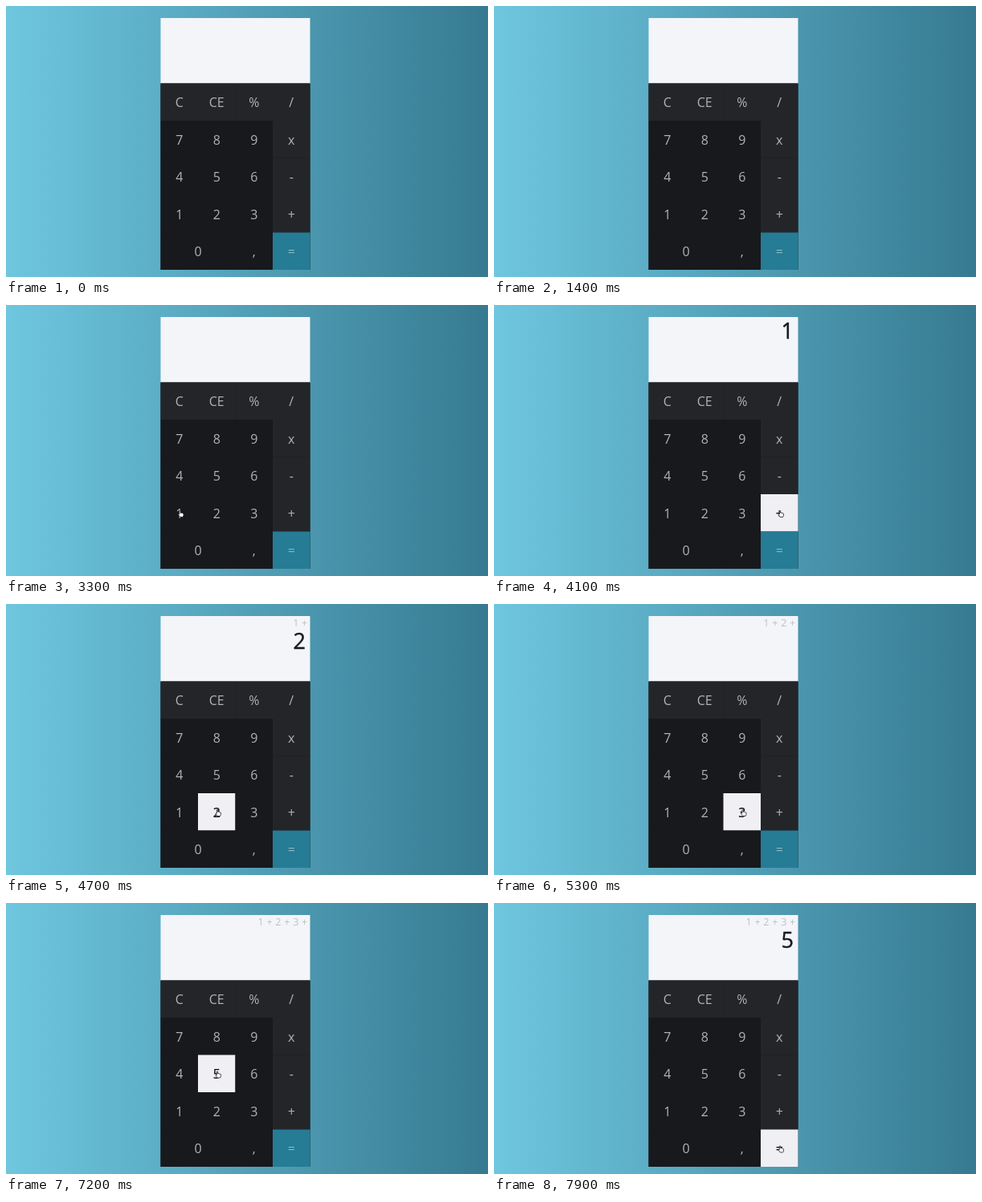
These frames come from a looping animation (600x338 px, 8 s). An HTML page:

```html
<!DOCTYPE html>
<html lang="en">
<head>
<meta charset="utf-8">
<title>Calculator</title>
<style>
  html, body { margin: 0; width: 100%; height: 100%; overflow: hidden; }
  body { background: linear-gradient(90deg, #6ec7df, #367a91); }
  svg { display: block; width: 600px; height: 338px; }
  text { font-family: "Open Sans", "Noto Sans", sans-serif; }
  .key text { font-size: 16px; text-anchor: middle; fill: #b2b3b7; }
  .key rect { fill: #18191c; }
  .key.op rect { fill: #242529; }
  .key.equals rect { fill: #267b95; }
  .key.equals text { fill: #92bac6; }
  .key.lit rect { fill: #f0eff4; }
  .key.lit text { fill: #08080a; stroke: #08080a; stroke-width: .2px; }
  #history { font-size: 12.6px; word-spacing: .45px; fill: #bfc0c4; text-anchor: end; }
  #value { font-size: 27px; fill: #18191c; stroke: #18191c; stroke-width: .4px; text-anchor: end; }
  #pointer { fill: #fff; stroke: #222; stroke-linejoin: round; }
</style>
</head>
<body>
<svg viewBox="0 0 600 338">
  <rect x="192.5" y="15" width="186" height="82" fill="#f4f5f9"/>
  <rect x="192.5" y="96.5" width="186" height="232.5" fill="#18191c"/>
  <text id="history" x="375.3" y="28"></text>
  <text id="value" x="373" y="56"></text>
  <g id="keys"></g>
  <g id="pointer">
    <path id="arrow" d="M-4-6V5L-1.5 2.8 0 6.3 1.7 5.5.2 2.2H3.5Z"/>
    <path id="hand" d="M-2.3 1V-4.3Q-1.5-5.8-.7-4.3V-1.2Q.5-2 1.1-.9 2.3-1.5 2.7-.4 4-.7 4 .6V2.6L2.9 5.2H-1.4L-4 1.4Q-3.7.1-2.3 1Z"/>
  </g>
</svg>
<script>
const LOOP = 8000, STEP = 100, CELL = 46.5, LEFT = 192.5, TOP = 96.5;
const ENTER = 1800, SETTLE = 3300, START = { x: 57, y: 325 };
const TRAVEL = 300, LINGER = 200;
const byId = id => document.getElementById(id);
const keys = [];

function make(tag, parent, attrs) {
  const node = document.createElementNS("http://www.w3.org/2000/svg", tag);
  for (const name in attrs) node.setAttribute(name, attrs[name]);
  return parent.appendChild(node);
}

function addKey(label, col, row, span = 1) {
  const type = label === "=" ? " equals" : row === 0 || col === 3 ? " op" : "";
  const node = make("g", byId("keys"), { class: "key" + type });
  const x = LEFT + col * CELL, y = TOP + row * CELL, width = span * CELL;
  make("rect", node, { x, y, width, height: CELL });
  make("text", node, { x: x + width / 2, y: y + CELL / 2 + 6.4 }).textContent = label;
  keys.push({ label, node, x, y, width });
}

["C CE % /", "7 8 9 x", "4 5 6 -", "1 2 3 +"].forEach((line, row) =>
  line.split(" ").forEach((label, col) => addKey(label, col, row)));
addKey("0", 0, 4, 2);
addKey(",", 2, 4);
addKey("=", 3, 4);

// Each press fixes the pointer's route, the hovered key and the readout.
const times = [3600, 4300, 4700, 5000, 5500, 6700, 7400, 8100];
const presses = [..."1+2+3+5="].map((label, i) => {
  const key = keys.find(k => k.label === label);
  return { label, time: times[i], x: key.x + key.width / 2 + 2, y: key.y + CELL / 2 + 1 };
});

const smooth = u => u * u * (3 - 2 * u);
const overshoot = u => 1 + 4 * (u - 1) ** 3 + 3 * (u - 1) ** 2;
const mix = (a, b, u) => ({ x: a.x + (b.x - a.x) * u, y: a.y + (b.y - a.y) * u });
const progress = (t, start, end) => Math.min(1, Math.max(0, (t - start) / (end - start)));

function pointerAt(t) {
  const next = presses.findIndex(press => press.time > t);
  const to = presses[next];
  if (next === 0) return mix(START, to, overshoot(progress(t, ENTER, SETTLE)));
  const from = presses[next - 1], arrival = to.time - LINGER;
  const departure = Math.max(from.time, arrival - TRAVEL);
  return mix(from, to, smooth(progress(t, departure, arrival)));
}

function readoutAt(t) {
  let history = "", value = "";
  for (const { label, time } of presses) {
    if (time > t) break;
    if (label === "+") {
      history += ` ${value} +`;
      value = "";
    } else value += label;
  }
  return { history: history.trim(), value };
}

const show = (id, on) => byId(id).style.display = on ? "" : "none";

function draw(now) {
  const t = Math.floor(now % LOOP / STEP) * STEP;
  const { x, y } = pointerAt(t);
  show("pointer", t >= ENTER);
  show("arrow", x <= LEFT);
  show("hand", x > LEFT);
  byId("pointer").setAttribute("transform", `translate(${x} ${y}) scale(.82)`);

  for (const key of keys) {
    const inside = x >= key.x && x < key.x + key.width && y >= key.y && y < key.y + CELL;
    key.node.classList.toggle("lit", t > SETTLE && inside);
  }

  const { history, value } = readoutAt(t);
  byId("history").textContent = history;
  byId("value").textContent = value;
  byId("value").setAttribute("y", history ? 56 : 42);
}

const begin = performance.now();
function tick() {
  draw(performance.now() - begin);
  requestAnimationFrame(tick);
}
tick();
</script>
</body>
</html>
```
